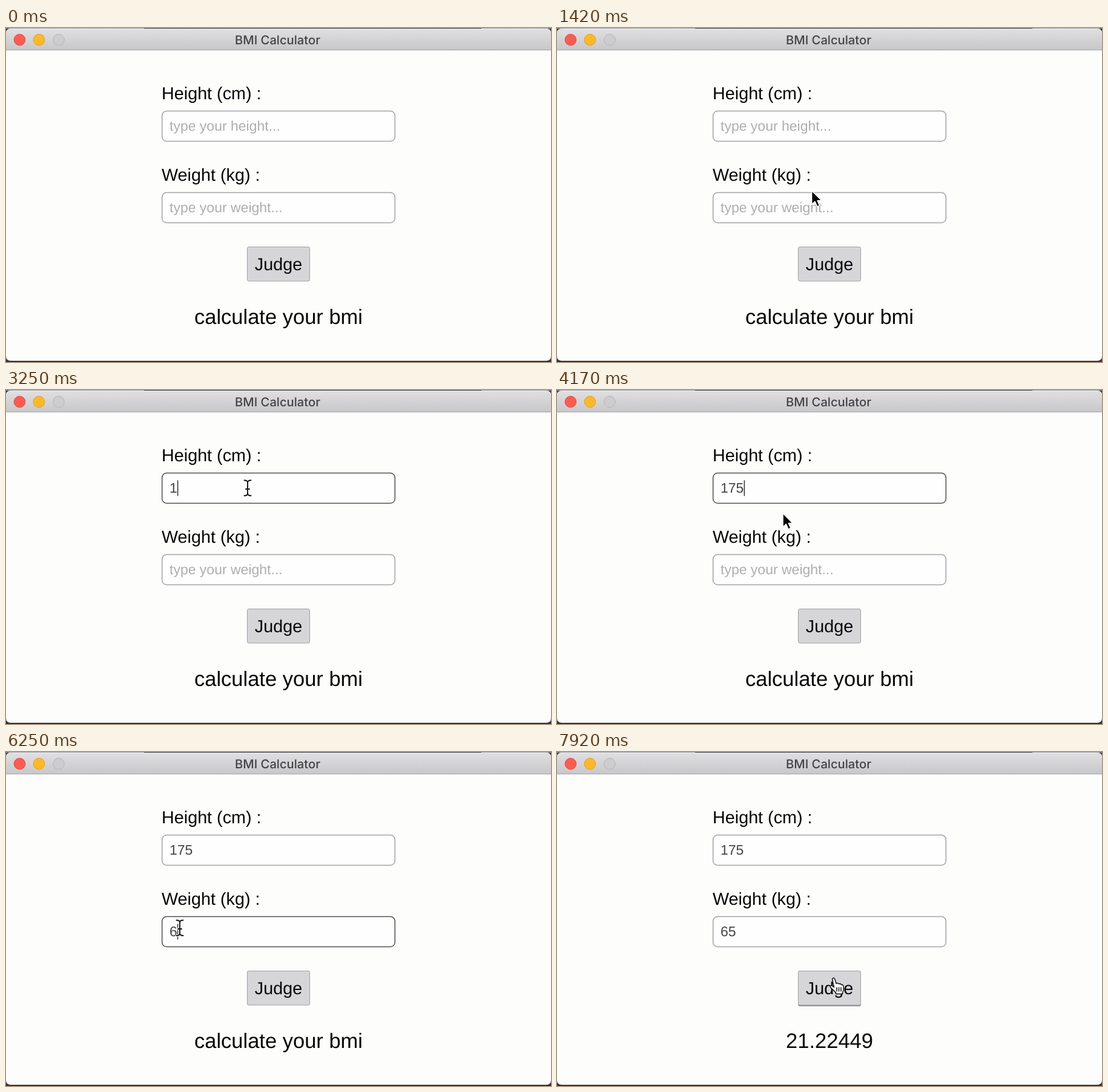
These frames come from a looping animation (900 by 553 pixels, 8000 ms). An HTML page:

```html
<!DOCTYPE html>
<html lang="en">
<head>
<meta charset="utf-8">
<title>BMI Calculator</title>
<style>
  html, body { margin: 0; width: 100%; height: 100%; overflow: hidden; background: #34343a; }
  svg { display: block; width: 100%; height: 100%; }
  text { font-family: "Liberation Sans", Arial, sans-serif; font-size: 28.75px; fill: #060606;
    white-space: pre; text-rendering: geometricPrecision; }
  .title { font: 500 20.2px Inter, sans-serif; fill: #434345; }
  .value { font-size: 23px; }
  .mid { text-anchor: middle; }
  .result { font-size: 34.5px; }
  .field rect { fill: #fefefe; stroke-width: 1.5; }
  .caret { stroke: #303030; stroke-width: 1.5; }
</style>
</head>
<body>
<svg viewBox="0 0 900 553">
  <defs>
    <linearGradient id="bar" x2="0" y2="1">
      <stop offset="0" stop-color="#e0e0e2"/>
      <stop offset="1" stop-color="#c7c7ca"/>
    </linearGradient>
  </defs>
  <rect width="900" height="553" fill="#34343a"/>
  <path d="M0 .5H228M785 .5H900" stroke="#a0a0a6"/>
  <path d="M0 9Q0 1 8 1H892Q900 1 900 9V543Q900 551 892 551H8Q0 551 0 543Z" fill="#fdfdfc"/>
  <path d="M0 37V9Q0 1 8 1H892Q900 1 900 9V37Z" fill="url(#bar)"/>
  <path d="M8 1.5H892" stroke="#efeff0"/>
  <path d="M0 36.5H900" stroke="#a8a8ab"/>
  <circle cx="22.5" cy="19.5" r="9.3" fill="#fc5b52" stroke="#e1483f"/>
  <circle cx="54.5" cy="19.5" r="9.3" fill="#fdb924" stroke="#dfa023"/>
  <circle cx="87" cy="19.5" r="9.3" fill="#cdcdcf" stroke="#b5b5b7"/>
  <text class="title mid" x="448.5" y="27">BMI Calculator</text>

  <text x="257" y="118">Height (cm) :</text>
  <g class="field" id="height">
    <rect x="257.7" y="137.5" width="384.6" height="50" rx="7.5"/>
    <text class="value" x="270" y="170"></text>
    <path class="caret"/>
  </g>
  <text x="257" y="253">Weight (kg) :</text>
  <g class="field" id="weight">
    <rect x="257.7" y="272.5" width="384.6" height="50" rx="7.5"/>
    <text class="value" x="270" y="305"></text>
    <path class="caret"/>
  </g>

  <rect id="shade" x="398" y="364" width="104" height="57" rx="3" fill="#8f8f97"/>
  <rect x="398.5" y="362.5" width="103" height="56.5" rx="2.5" fill="#d6d6d8" stroke="#a0a0a4"/>
  <text class="mid" x="450" y="400.5">Judge</text>
  <text class="mid result" id="result" x="450" y="489.5"></text>

  <g id="arrow">
    <path d="M0 0V23L5.3 18.2L9 26.5L13 24.7L9.5 16.6H16.5Z"
      fill="#050505" stroke="#fff" stroke-width="1.6" stroke-linejoin="round"/>
  </g>
  <g id="beam" fill="none" stroke-linecap="round">
    <path d="M-5.5 -12.5Q0 -12.5 0 -8.5Q0 -12.5 5.5 -12.5M0 -9V10M-5.5 13Q0 13 0 9Q0 13 5.5 13M-3 2H3"
      stroke="#fff" stroke-width="4"/>
    <path d="M-5.5 -12.5Q0 -12.5 0 -8.5Q0 -12.5 5.5 -12.5M0 -9V10M-5.5 13Q0 13 0 9Q0 13 5.5 13M-3 2H3"
      stroke="#111" stroke-width="1.9"/>
  </g>
  <g id="hand" stroke="#111" stroke-width="1.5" stroke-linejoin="round" stroke-linecap="round">
    <path d="M-5.5 -11Q-4 -14.5 -1.5 -11.5L1.3 -3.5Q4 -5.5 5.3 -3Q8 -4.5 9.2 -1.8Q12.5 -2.5 13 1L13.3 6Q13.2 8 11.5 11V13.5H0.5V11.5L-8.5 2.5Q-9.5 -.8 -6 -.2L-2.5 2.5Z" fill="#fff"/>
    <path d="M2 3V9M5.5 3V9M9 3V9" fill="none"/>
  </g>
</svg>
<script>
const LOOP = 8000, STEP = 1000 / 12;
const $ = id => document.getElementById(id);

// Pointer stops: time, x, y
const stops = [
  [80, 610, 572], [920, 429, 302], [1250, 426, 296], [1830, 399, 162],
  [3720, 399, 162], [4170, 373, 204], [4830, 285, 281], [5080, 287, 291],
  [6750, 287, 291], [7420, 460, 387], [8000, 460, 387]
];

const fields = [
  { el: $("height"), top: 137, hint: "type your height...", focus: [2000, 5160],
    keys: [[3080, "1"], [3400, "17"], [3720, "175"]] },
  { el: $("weight"), top: 272, hint: "type your weight...", focus: [5160, 7580],
    keys: [[6160, "6"], [6420, "65"]] }
];

const smooth = u => u * u * (3 - 2 * u);
const within = (p, x, y, w, h) => p.x >= x && p.x <= x + w && p.y >= y && p.y <= y + h;
const show = (el, on) => el.setAttribute("visibility", on ? "visible" : "hidden");

function pointerAt(t) {
  let i = 0;
  while (i < stops.length - 2 && t >= stops[i + 1][0]) i++;
  const [t0, x0, y0] = stops[i], [t1, x1, y1] = stops[i + 1];
  const u = smooth(Math.min(1, Math.max(0, (t - t0) / (t1 - t0))));
  return { x: x0 + (x1 - x0) * u, y: y0 + (y1 - y0) * u };
}

function drawField(f, t, hover) {
  const [box, label, caret] = f.el.children;
  const typed = f.keys.reduce((s, [at, text]) => t >= at ? text : s, "");
  const focused = t >= f.focus[0] && t < f.focus[1];
  box.style.stroke = hover || focused ? "#505052" : "#a3a3a8";
  label.textContent = typed || f.hint;
  label.style.fill = typed ? "#444" : "#aeaeae";

  // Typing restarts the blink
  const since = f.keys.reduce((s, [at]) => t >= at ? at : s, f.focus[0]);
  const x = 270.7 + typed.length * 12.9;
  caret.setAttribute("d", `M${x} ${f.top + 12.5}v26`);
  show(caret, focused && (t - since) % 1000 < 500);
}

function draw(now) {
  const t = Math.floor((now % LOOP + 4) / STEP) * STEP;
  const p = pointerAt(t);
  const overField = fields.map(f => within(p, 257, f.top, 386, 51));
  const overButton = within(p, 398, 362, 104, 58);
  fields.forEach((f, i) => drawField(f, t, overField[i]));

  const kind = overButton ? "hand" : overField.some(Boolean) ? "beam" : "arrow";
  for (const id of ["arrow", "beam", "hand"]) {
    show($(id), id === kind);
    $(id).setAttribute("transform", `translate(${p.x} ${p.y})`);
  }
  show($("shade"), overButton);
  $("result").textContent = t >= 7660 ? "21.22449" : "calculate your bmi";
}

const start = performance.now();
function tick() {
  draw(performance.now() - start);
  requestAnimationFrame(tick);
}
tick();
</script>
</body>
</html>
```
